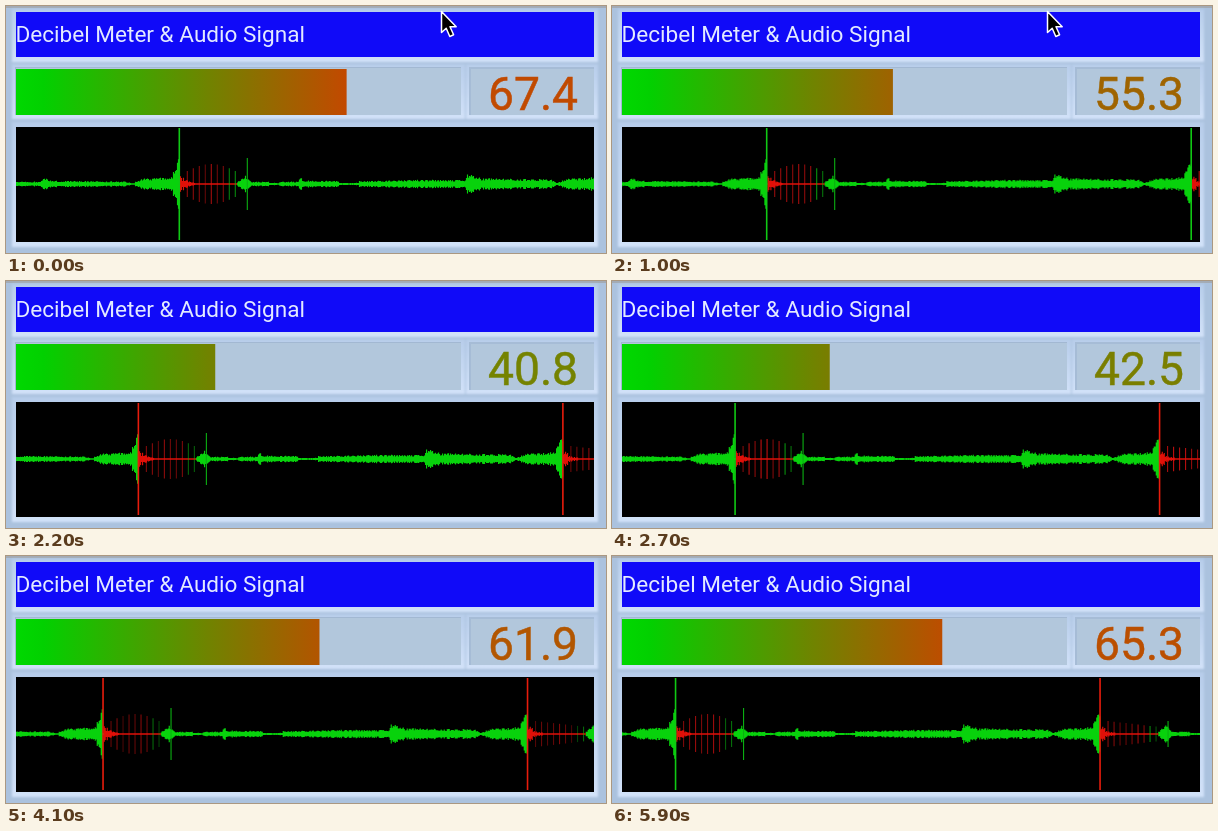
An HTML page for the animation above (6000 ms loop, 600 px wide and 247 px high).

```html
<!DOCTYPE html>
<html lang="en">
<head>
<meta charset="utf-8">
<title>Decibel Meter</title>
<style>
html, body { margin: 0; width: 100%; height: 100%; overflow: hidden; background: #abc2de; }
svg { display: block; width: 600px; height: 247px; }
text { font-family: Roboto, Arial, sans-serif; }
</style>
</head>
<body>
<svg viewBox="0 0 600 247">
  <defs>
    <linearGradient id="level" gradientUnits="userSpaceOnUse" x1="8" x2="501" y1="0" y2="0">
      <stop offset="0" stop-color="#00d900"/>
      <stop offset=".06" stop-color="#02d000"/>
      <stop offset=".39" stop-color="#6f8400"/>
      <stop offset=".67" stop-color="#c14a00"/>
      <stop offset="1" stop-color="#ff0a00"/>
    </linearGradient>
    <linearGradient id="edge" x1="0" x2="0" y1="0" y2="1">
      <stop offset="0" stop-color="#b7cdea"/>
      <stop offset="1" stop-color="#d2e2f9"/>
    </linearGradient>
    <filter id="soft"><feGaussianBlur stdDeviation=".8"/></filter>
    <clipPath id="screen"><rect x="10" y="121" width="578" height="115"/></clipPath>
  </defs>
  <rect width="600" height="247" fill="#abc2de"/>
  <rect width="600" height="2" fill="#a3abb5"/>
  <g fill="url(#edge)" filter="url(#soft)">
    <rect x="6" y="3" width="586" height="53"/>
    <rect x="6" y="58" width="453" height="55"/>
    <rect x="460" y="58" width="132" height="55"/>
    <rect x="6" y="116" width="586" height="125"/>
  </g>

  <rect x="10" y="6" width="578" height="45" fill="#100af8"/>
  <text x="9.4" y="36" font-size="22.6" fill="#e3eaff">Decibel Meter &amp; Audio Signal</text>

  <rect x="9" y="61" width="446" height="48" fill="#a2b8d2"/>
  <rect x="10" y="62" width="445" height="47" fill="#b2c7dc"/>
  <rect id="bar" x="10" y="63" height="46" fill="url(#level)"/>

  <rect x="463" y="61" width="125" height="48" fill="#a6bcd6"/>
  <rect x="465" y="63" width="123" height="46" fill="#b2c7dc"/>
  <text id="reading" x="527" y="104" font-size="46.2" text-anchor="middle" stroke-width=".5"></text>

  <rect x="10" y="121" width="578" height="115"/>
  <g clip-path="url(#screen)">
    <g id="wave" fill="none" stroke-width="1.15">
      <path id="green" stroke="#08d20c"/>
      <path id="red" stroke="#e01008"/>
    </g>
  </g>
  <path id="cursor" d="M435.500 5.500V26.500L440.200 22.200L443.800 30.500L447.600 28.800L444 20.800H450.200Z"
    stroke="#fff" stroke-width="1.5" stroke-linejoin="round"/>
</svg>
<script>
const $ = id => document.getElementById(id);
const MID = 178, LOOP = 6000, STEP = 100;
const BEAT = 424.5, TICKS = 9;

const noise = n => {
  const s = Math.sin(n * 127.1 + 11.7) * 43758.5453;
  return s - Math.floor(s);
};
const line = (u, a) => `M${u} ${(MID - a).toFixed(1)}V${(MID + a).toFixed(1)}`;

// Linear interpolation through [position, value] points
function through(points, x) {
  const i = Math.max(1, points.findIndex(p => p[0] >= x));
  const [x0, a] = points[i - 1], [x1, b] = points[i];
  return a + (b - a) * (x - x0) / (x1 - x0);
}

// Loudness over one beat: echo, murmur, swell, build-up to the next peak
const beatShape = [[0, 1], [57, 1], [66, 8], [72, 2], [119, 2], [121, 7], [124, 3],
  [190, 2.6], [240, 3.7], [286, 3.7], [288, 9], [303, 5], [371, 4], [378, 1],
  [387, 4.5], [417, 6], [419, 13], [425, 26]];

function loudness(u) {
  const beat = Math.floor(u / BEAT), p = u - beat * BEAT;
  const pause = p > 72 && p < 200 && noise(Math.floor(p / 10)) < 0.35;
  const quiet = beat < 0 && p < 380 ? 0.55 : 1;
  const rough = 0.68 + 0.5 * noise(u);
  return Math.max(0.8, (pause ? 1 : through(beatShape, p) * quiet) * rough);
}

let green = "", red = "";
for (let u = -175; u < 545; u++) {
  const p = u - Math.floor(u / BEAT) * BEAT;
  if (u > 0 && p < 58) red += line(u + 0.5, Math.max(0.7, 7 * Math.exp(-p / 7) * (0.6 + noise(u))));
  else green += line(u + 0.5, loudness(u));
}
$("green").setAttribute("d", green);
$("red").setAttribute("d", red);

function addLine(u, a, color, width = 1.1) {
  const el = document.createElementNS("http://www.w3.org/2000/svg", "path");
  el.setAttribute("d", line(u, a));
  el.setAttribute("stroke", color);
  el.setAttribute("stroke-width", width);
  $("wave").append(el);
  return el;
}

// Each peak is followed by evenly spaced ticks and a short echo
const ticks = [], peaks = [];
[0, 1].forEach(beat => {
  const u = beat * BEAT;
  for (let i = 0; i < TICKS; i++) {
    const a = beat ? 13 - 0.7 * i : 13 + 7 * Math.sin(Math.PI * i / (TICKS - 1));
    ticks.push(addLine(u + 8.3 + 6 * i, a, i < TICKS - 2 ? "#e01212" : "#0bbd12"));
  }
  addLine(u + 68.3, beat ? 13 : 26, "#0bb012");
  peaks.push(addLine(u + 0.3, 56, "#10c914", 1.6));
});

const levels = [[0, 67.4], [1000, 55.3], [1800, 39.4], [2700, 42.5],
  [4100, 61.9], [5000, 65.7], [5900, 65.3], [6000, 67.4]];

function draw(time) {
  const t = Math.floor((time % LOOP) / STEP) * STEP;
  const v = through(levels, t);
  const color = `rgb(${Math.round(v * 2.87)},${Math.round(217 - v * 2.12)},0)`;
  $("bar").setAttribute("width", (v * 4.935 - 2).toFixed(2));
  $("reading").textContent = v.toFixed(1);
  $("reading").setAttribute("fill", color);
  $("reading").setAttribute("stroke", color);
  $("wave").setAttribute("transform", `translate(${(173 - t * 0.0186).toFixed(2)} 0)`);

  // Thin lines shimmer as the trace scrolls
  const shimmer = Math.cos(2 * Math.PI * (t - 1800) / 2300);
  const hot = [shimmer > 0.4, t > 1400];
  peaks.forEach((el, i) => el.setAttribute("stroke", hot[i] ? "#e81c0c" : "#10c914"));
  ticks.forEach((el, i) =>
    el.setAttribute("opacity", (0.6 - 0.15 * shimmer + 0.3 * (noise(i + t / STEP * 7) - 0.5)).toFixed(2)));
  $("cursor").setAttribute("visibility", t < 2200 ? "visible" : "hidden");
}

const start = performance.now();
function tick() {
  draw(performance.now() - start);
  requestAnimationFrame(tick);
}
draw(0);
requestAnimationFrame(tick);
</script>
</body>
</html>
```
